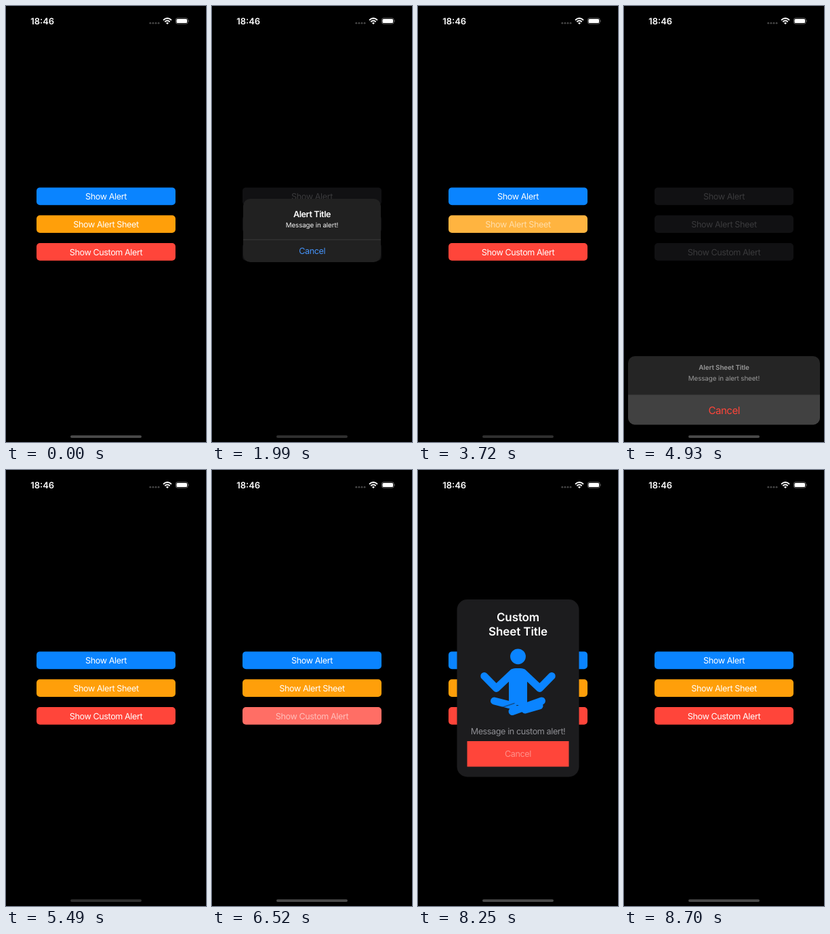
An HTML page for the animation above (8790 ms loop, 295 by 640 pixels).

```html
<!DOCTYPE html>
<html lang="en">
<head>
<meta charset="utf-8">
<title>Alerts</title>
<style>
  html, body { margin: 0; width: 100%; height: 100%; overflow: hidden; background: #000; }
  svg { display: block; width: 100%; height: 100%; }
  text { font-family: Inter, "Open Sans", sans-serif; text-anchor: middle; text-rendering: geometricPrecision; }
  .body { font-size: 12.6px; letter-spacing: -.4px; }
  .small { font-size: 9.8px; letter-spacing: -.1px; }
  .bold { font-weight: 600; }
</style>
</head>
<body>
<svg viewBox="0 0 295 640" xmlns="http://www.w3.org/2000/svg">
  <defs>
    <clipPath id="alertClip"><rect x="46" y="283" width="203" height="93" rx="10.5"/></clipPath>
    <clipPath id="sheetClip"><rect x="6" y="514" width="283" height="100.5" rx="10"/></clipPath>
  </defs>
  <rect width="295" height="640"/>

  <g id="buttons"></g>

  <g id="alert">
    <g clip-path="url(#alertClip)">
      <rect x="46" y="283" width="203" height="93" fill="#212121"/>
      <rect id="alertKey" x="46" y="343" width="203" height="33" fill="#414141"/>
      <rect x="46" y="342.6" width="203" height=".8" fill="#404040"/>
    </g>
    <text class="body bold" x="147.5" y="310" fill="#fff">Alert Title</text>
    <text class="small" x="147.5" y="325" fill="#f2f2f2">Message in alert!</text>
    <text class="body" x="147.7" y="364.3" fill="#4592f7">Cancel</text>
  </g>

  <g id="sheet">
    <g clip-path="url(#sheetClip)">
      <rect x="6" y="514" width="283" height="101" fill="#252525"/>
      <rect id="sheetKey" x="6" y="571" width="283" height="44" fill="#414141"/>
      <rect x="6" y="570.6" width="283" height=".8" fill="#404040"/>
    </g>
    <text class="small bold" x="147.5" y="534" fill="#999">Alert Sheet Title</text>
    <text class="small" x="147.5" y="550.3" fill="#999">Message in alert sheet!</text>
    <text x="147.7" y="598.6" font-size="15" letter-spacing="-.45" fill="#ff453a">Cancel</text>
  </g>

  <g id="custom">
    <rect x="57.5" y="190" width="180" height="260.5" rx="15" fill="#1c1c1e"/>
    <g font-size="17" font-weight="600" letter-spacing="-.1" fill="#fff">
      <text x="147.5" y="222">Custom</text>
      <text x="147.5" y="243">Sheet Title</text>
    </g>
    <g fill="#0a84ff" stroke="#0a84ff" stroke-width="11" stroke-linecap="round" stroke-linejoin="round">
      <circle cx="147.5" cy="273.8" r="11.4" stroke="none"/>
      <path d="M140 297.5L115.500 320.500L97.800 302.500M155 297.500L179.500 320.500L197.200 302.500" fill="none"/>
      <path d="M134 303Q134 291 144 291H151Q161 291 161 303V345H134Z" stroke="none"/>
      <path d="M112.500 339L140 346M182.500 339L139 354.500M158 352L179 346" fill="none"/>
      <path d="M142 342.500L124 348.500" stroke="#1c1c1e" stroke-width="1.500" fill="none" opacity=".5"/>
    </g>
    <text class="body" x="147.5" y="388" fill="#8e8e93">Message in custom alert!</text>
    <rect x="72.500" y="398" width="150" height="37.500" fill="#ff453a"/>
    <text id="customKey" class="body" x="147.500" y="421.300" fill="#fff">Cancel</text>
  </g>

  <g fill="#fff">
    <text class="bold" x="53.700" y="26.600" font-size="13">18:46</text>
    <g fill="#454545">
      <circle cx="212.800" cy="25.200" r="1.400"/><circle cx="216.900" cy="25.200" r="1.400"/>
      <circle cx="221" cy="25.200" r="1.400"/><circle cx="225.100" cy="25.200" r="1.400"/>
    </g>
    <g fill="none" stroke="#fff" stroke-width="1.900">
      <path d="M232 20.700Q238 15.300 244 20.700M234.300 23.200Q238 19.900 241.700 23.200"/>
    </g>
    <path d="M236 24.900Q238 23.200 240 24.900L238 27Z"/>
    <rect x="250.300" y="17.800" width="18" height="8.400" rx="2.700" fill="none" stroke="#777" stroke-width=".8"/>
    <rect x="251.500" y="19" width="15.600" height="6" rx="1.600"/>
    <path d="M269.300 20.500Q271 22 269.300 23.500Z" fill="#777"/>
  </g>
  <rect id="home" x="95" y="630.200" width="105" height="3.800" rx="1.900"/>
</svg>
<script>
const LOOP = 8790;
const $ = id => document.getElementById(id);
const mix = (a, b, k) => a.map((v, i) => v + (b[i] - v) * k);
const rgb = c => `rgb(${c.map(Math.round)})`;
const within = (t, a, b) => t >= a && t < b;
const show = (el, on) => el.setAttribute('visibility', on ? 'visible' : 'hidden');

const WHITE = [255, 255, 255], DIM_FILL = [17, 17, 19], DIM_TEXT = [58, 58, 60];
const BUTTONS = [
  { label: 'Show Alert', y: 266.4, color: [10, 132, 255], press: [1360, 1500] },
  { label: 'Show Alert Sheet', y: 307.2, color: [255, 159, 10], press: [3720, 3850] },
  { label: 'Show Custom Alert', y: 348, color: [255, 69, 58], press: [6400, 6530] }
];

function add(tag, attrs) {
  const el = document.createElementNS('http://www.w3.org/2000/svg', tag);
  for (const k in attrs) el.setAttribute(k, attrs[k]);
  return $('buttons').appendChild(el);
}

for (const b of BUTTONS) {
  b.rect = add('rect', { x: 45, y: b.y, width: 205, height: 25.8, rx: 5 });
  b.text = add('text', { class: 'body', x: 147.5, y: b.y + 17.6 });
  b.text.textContent = b.label;
}

// Critically damped spring from 0 to 1, beginning at the given time
function spring(t, start) {
  const x = Math.max(0, t - start) * 0.01826;
  const v = 1 - (1 + x) * Math.exp(-x);
  return v > 0.996 ? 1 : v;
}
const presence = (t, open, close) => spring(t, open) * (1 - spring(t, close));

function draw(t) {
  const alert = presence(t, 1500, 2800);
  const sheet = presence(t, 3840, 5040);
  const custom = presence(t, 6530, 8340);
  const dim = Math.max(alert, sheet);

  for (const b of BUTTONS) {
    const down = within(t, ...b.press);
    const fill = down ? mix(b.color, WHITE, 0.22) : b.color;
    const ink = down ? mix(fill, WHITE, 0.55) : WHITE;
    b.rect.setAttribute('fill', rgb(mix(fill, DIM_FILL, dim)));
    b.text.setAttribute('fill', rgb(mix(ink, DIM_TEXT, dim)));
  }

  const scale = t < 2680 ? 1.2 - 0.2 * spring(t, 1500) : 1;
  show($('alert'), alert > 0);
  $('alert').setAttribute('opacity', alert);
  $('alert').setAttribute('transform', `translate(147.5 329.5) scale(${scale}) translate(-147.5 -329.5)`);
  $('alertKey').setAttribute('opacity', +within(t, 2680, 3200));

  show($('sheet'), sheet > 0);
  $('sheet').setAttribute('transform', `translate(0 ${130 * (1 - sheet)})`);
  $('sheetKey').setAttribute('opacity', +within(t, 4930, 5500));

  show($('custom'), custom > 0);
  $('custom').setAttribute('transform', `translate(0 ${640 * (1 - custom)})`);
  $('customKey').setAttribute('opacity', within(t, 8250, 8370) ? 0.4 : 1);

  const faint = within(t, 1540, 3860) || within(t, 5300, 6400);
  $('home').setAttribute('fill', faint ? '#303030' : '#4a4a4a');
}

const origin = performance.now();
function tick() {
  draw((performance.now() - origin) % LOOP);
  requestAnimationFrame(tick);
}
tick();
</script>
</body>
</html>
```
